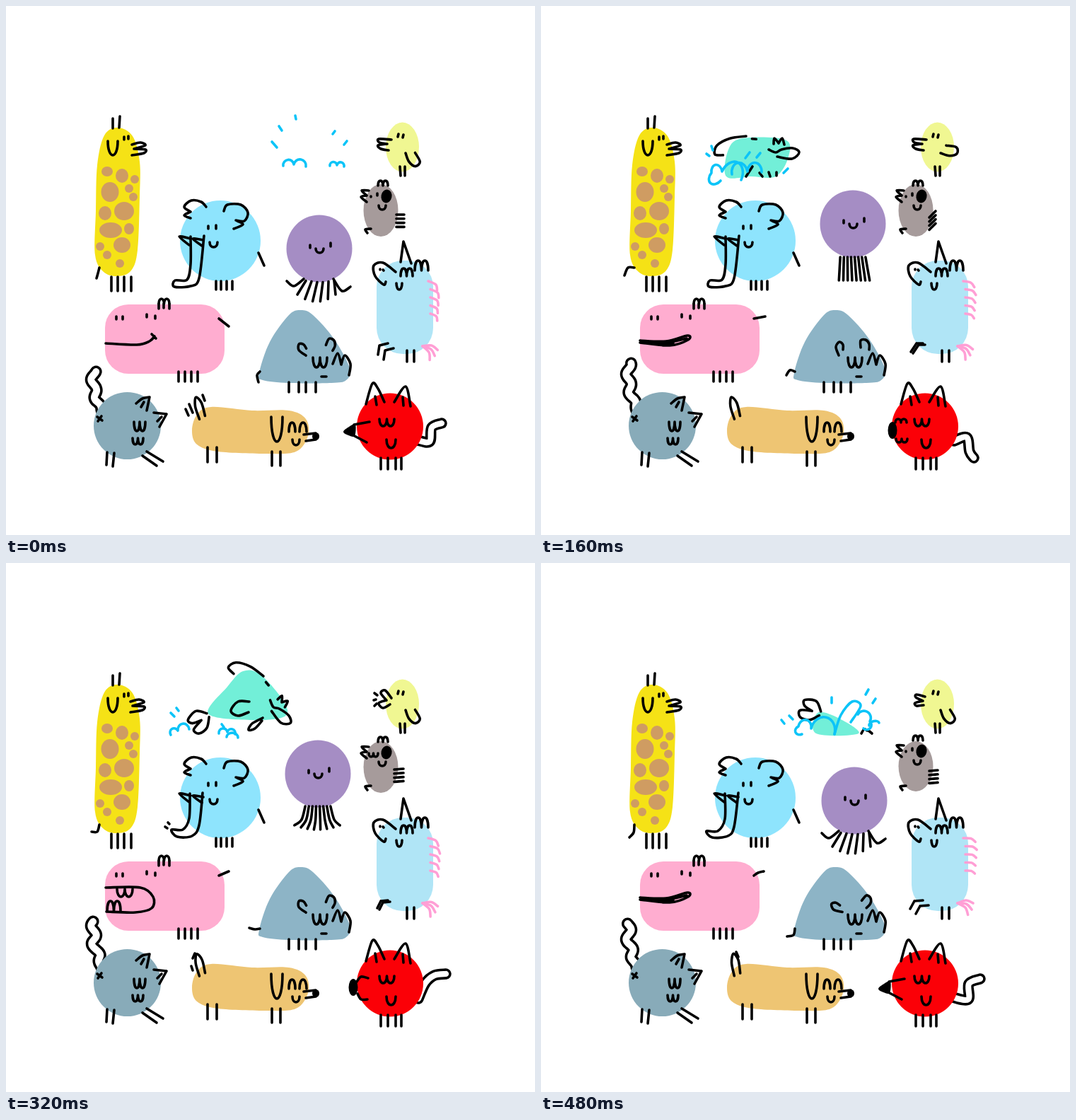
An HTML page with a canvas for the animation above (0.56 s loop, 748 by 748 pixels).

```html
<!DOCTYPE html>
<html lang="en">
<head>
<meta charset="utf-8">
<title>Animal parade</title>
<style>
html, body { margin: 0; width: 100%; height: 100%; overflow: hidden; background: #fff }
canvas { display: block }
</style>
</head>
<body>
<canvas id="stage" width="748" height="748"></canvas>
<script>
const ctx = document.getElementById('stage').getContext('2d');
const STEP = 80, COUNT = 7, WATER = '#0cc4f8', PINK = '#ff9fd5';
let pose = 0;

// Smooth curves through points; "|" starts a new stroke
function spline(text, closed) {
  const path = new Path2D();
  for (const part of text.split('|')) {
    const pts = part.match(/\S+ \S+/g).map(pair => pair.split(' ').map(Number));
    const n = pts.length;
    const at = i => pts[closed ? (i + n) % n : Math.max(0, Math.min(n - 1, i))];
    path.moveTo(...pts[0]);
    for (let i = 0; i < (closed ? n : n - 1); i++) {
      const [a, b, c, d] = [at(i - 1), at(i), at(i + 1), at(i + 2)];
      path.bezierCurveTo(b[0] + (c[0] - a[0]) / 6, b[1] + (c[1] - a[1]) / 6,
        c[0] - (d[0] - b[0]) / 6, c[1] - (d[1] - b[1]) / 6, ...c);
    }
  }
  return path;
}
function stroke(path, color = '#000', width = 3.6) {
  ctx.strokeStyle = color;
  ctx.lineWidth = width;
  ctx.stroke(path);
}
const ink = (text, color, width) => stroke(spline(text), color, width);
function fill(text, color) {
  ctx.fillStyle = color;
  ctx.fill(spline(text, true));
}
function oval(x, y, rx, ry, color = '#000', turn = 0) {
  ctx.fillStyle = color;
  ctx.beginPath();
  ctx.ellipse(x, y, rx, ry, turn, 0, 7);
  ctx.fill();
}
function box(x, y, w, h, r, color) {
  ctx.fillStyle = color;
  ctx.beginPath();
  ctx.roundRect(x, y, w, h, r);
  ctx.fill();
}
// Row of U shapes, upside down when h is negative
function cups(x, y, w, h, n = 1) {
  stroke(new Path2D(`M${x} ${y}` + `c0 ${h * 1.33} ${w} ${h * 1.33} ${w} 0`.repeat(n)));
}
function legs(top, bottom, ...xs) {
  xs.forEach(x => ink(`${x} ${top} ${x} ${bottom}`));
}
// Chain of arches between points
function waves(text, tall) {
  let last;
  stroke(new Path2D(text.match(/\S+ \S+/g).map(pair => {
    const p = pair.split(' ').map(Number);
    const turn = last && Math.atan2(p[1] - last[1], p[0] - last[0]) * 180 / Math.PI;
    const step = last ? `A1 ${tall} ${turn} 0 1 ${pair}` : `M${pair}`;
    last = p;
    return step;
  }).join('')), WATER);
}
function tube(text, width) {
  ink(text, '#000', width);
  ink(text, '#fff', width - 7.2);
}
function place(x, y, turn, draw) {
  ctx.save();
  ctx.translate(x, y);
  ctx.rotate(turn);
  draw();
  ctx.restore();
}
const now = list => list[pose];
const pick = (digits, ...list) => list[digits[pose]];

function giraffe() {
  fill('158 172 139 183 129 225 127 290 126 352 138 376 158 382 177 374 186 345 189 270 189 220 179 184', '#f5e216');
  ['143 234 8 7', '164 240 9 10', '182 245 6 6', '147 263 12.5 14', '174 258 6 6', '180 270 6 6', '167 290 14 13',
   '140 293 9 10', '148 317 16 11', '174 315 7 8', '164 338 12 11', '133 340 6 6', '143 352 6 6', '161 364 6 6']
    .forEach(spot => oval(...spot.split(' ').map(Number), '#cf9c62'));
  ink('151 159 151 173|161 156 160 172|167 185 167 189|173 184 173 188');
  cups(144, 191, 14, 20);
  legs(383, 403, 149, 158, 167, 177);
  place(pick('0101100', 0, -2), 0, 0, () => ink('178 196 190 193 197 197 181 202|181 202 197 203 195 208 178 211'));
  ink('132 370 ' + now(['130 378 128 385', '127 373 126 384', '123 370 118 381', '126 375 116 375', '129 380 121 380',
    '132 379 128 383', '131 381 125 388']));
}

function elephant() {
  oval(303, 332, 57, 57, '#8ee4fd');
  ink('261 300 252 296 261 291|261 291 252 284 262 275 276 277 283 284|308 290 313 281 332 281 342 292 337 304 325 303|327 304 335 309 322 315');
  ink('286 311 286 315|297 310 297 315|357 349 365 367');
  cups(288, 334, 11, 7);
  legs(389, 401, 297, 304, 312, 320);
  ink('261 329 245 326 259 338|279 331 264 329 277 339');
  ink(pick('0000123',
    '261 326 261 365 256 387 239 388 238 397 261 396 273 385 280 325',
    '260 326 259 361 250 377 234 377 242 387 263 386 273 371 278 325|229 367 231 369|225 373 228 375',
    '260 326 258 359 245 373 230 361 228 371 247 380 266 374 277 325|219 349 224 353|226 347 227 352|231 346 230 352',
    '260 326 260 362 250 379 234 379 242 388 264 386 273 373 279 325'));
}

function octopus() {
  place(pick('0111100', 443, 441), now([343, 326, 308, 293, 298, 307, 336]), 0, () => {
    oval(0, 0, 46.5, 47.5, '#a58dc4');
    ink('-13 -5 -13 -1|16 -8 16 -3');
    cups(-5, 0, 11, 6);
    const curl = pick('0122100', true), straight = pick('1100011', true);
    if (curl) ink('-46 46 -36 53 -22 43|20 43 32 60 44 54');
    const n = curl ? 6 : 8;
    for (let i = 0; i < n; i++) {
      const u = i - (n - 1) / 2;
      if (curl) ink(`${1 + u * 8} ${48 - Math.abs(u)} ${u * 10.8 - 4} ${75 - u * u * 1.6}`);
      else if (pick('0122100', 0, 0, 1)) ink(`${u * 5.1} 47 ${u * 6.2 + 2} 80`);
      else ink(`${u * 5.1} 46 ${u * 6.6} 65 ${u * 9.2 - 1} ${79 - u * u / 2}`);
    }
  });
}

function bird() {
  oval(560.5, 199.5, 23.5, 35, '#f0f792');
  ink('555 181 554 185|562 182 561 186|557 227 558 240|564 227 564 240');
  ink(pick('0001231',
    '545 189 527 188 528 193 539 195|539 195 526 197 530 202 541 204',
    '543 189 531 186 530 190 540 195|540 195 529 198 531 202 541 201',
    '545 191 536 180 530 184 538 194|538 194 527 198 533 205 543 200|521 184 525 187|520 194 523 193|521 202 524 199',
    '545 191 536 180 530 184 538 194|538 194 527 198 533 202 543 199|516 182 520 185|513 193 518 193|515 206 520 201'));
  place(565, 208, now([.8, .2, -.1, .1, .8, .4, .8]), () => ink('0 0 12 5 23 3 23 -6 9 -10'));
}

function koala() {
  const up = now([0, 0, 0, 1, 1, 5, 3]);
  oval(530, 289 - up / 2, 24.5, 37 - up / 2, '#a69b9b');
  place(0, -up, 0, () => {
    ink('513 261 503 261 510 268|510 268 502 270 510 277');
    cups(526, 254, 7, -7, 2);
    cups(527, 282, 10, 6);
    oval(538, 269, 7.5, 9.5, '#000', .2);
    if (pick('0001100', 0, 1)) cups(513, 270, 6.5, 5, 2);
    else ink('516 269 516 270|525 265 525 268');
  });
  ink('516 315 508 316 511 321');
  const [x, y, dx, dy] = now(['552 295 11 0', '552 297 9 -3', '549 299 9 -9', '550 294 11 -3', '549 292 13 -1', '550 290 13 2', '549 294 12 -1'])
    .split(' ').map(Number);
  for (let i = 0; i < 4; i++)
    ink(`${x} ${y + 5.8 * i} ${x + dx / 2} ${y + 5.8 * i + (pose === 1 ? -6 : dy / 2)} ${x + dx} ${y + 5.8 * i + dy}`);
}

function unicorn() {
  box(524, 360, 80, 132, 37, '#b0e5f6');
  ink('558 362 562 333|562 333 573 364|551 376 533 363 520 367 522 382 534 394 537 390|529 372 529 373|533 373 534 374');
  cups(558, 382, 8.5, -11, 2);
  cups(578, 374, 9.5, -14, 2);
  cups(552, 392, 8, 9);
  legs(487, 503, 567, 577);
  const [kx, ky, fx, fy] = now(['528 480 526 493', '529 475 521 489', '531 477 523 489', '531 475 523 482',
    '530 478 525 488', '528 476 521 482', '528 478 522 489']).split(' ').map(Number);
  const leg = `540 477 ${kx} ${ky}|${kx} ${ky} ${fx} ${fy}`, gap = pick('0011100', 8, 3);
  ink(leg);
  place(gap, gap - 1, 0, () => ink(leg));
  const tilt = now([.8, .65, .5, .6, .65, .5, .3]);
  for (let i = 0; i < 5; i++) {
    const x = i ? 600 : 597, y = 389 + i * 11.5, r = 18 - i;
    ink(`${x} ${y} ${x + r * .6} ${y + r * (tilt - .25) * .5} ${x + r * Math.cos(tilt)} ${y + r * Math.sin(tilt)}`, PINK);
  }
  for (let i = 0; i < 3; i++)
    place(589, 481, now([.25, .1, .2, .2, .2, .2, 0]) + i * .42, () => ink('0 0 12 -4 22 0', PINK));
}

function hippo() {
  box(140, 422, 169, 98, 33, '#ffadd0');
  cups(216, 421, 7.5, -7, 2);
  ink('216 421 216 428|223 421 223 427|231 421 231 428|156 439 156 443|165 439 165 443|199 436 199 440|211 438 211 442');
  legs(517, 531, 244, 253, 262, 271);
  const open = pick('0012321', 0, 1, 2, 3);
  ink(pick('0012321',
    '141 477 185 479 203 474 210 467|206 464 212 470',
    '140 473 177 474 207 466 208 472 182 480 140 476|141 475 173 477 206 470|166 475 173 480 187 477',
    '139 466 185 466 207 471 207 483 180 488 139 487',
    '141 459 190 459 208 472 206 488 183 494 142 493'));
  if (open === 2) {
    cups(159, 467, 10, 6, 2);
    cups(141, 487, 9.5, -8, 2);
  }
  if (open === 3) {
    cups(157, 461, 11, 11, 2);
    cups(143, 492, 9.5, -14, 2);
  }
  ink('301 442 ' + now(['315 453', '309 444 318 447', '317 439', '312 432', '315 436', '305 448 312 454', '307 438 315 436']));
}

function mouse() {
  fill('358 519 373 475 400 437 417 430 434 437 464 471 486 512 481 529 460 533 400 533 363 529', '#8db4c6');
  cups(434, 497, 10, 14, 2);
  ink('446 524 453 524|462 506 469 491 474 507|474 507 479 494 487 506 485 522');
  legs(532, 546, 400, 414, 424, 438);
  const tilt = now([.6, .25, 0, .25, .6, 1.45, 1]);
  place(423, 489, -tilt, () => ink('-2 5 -6 -7 -1 -14 4 -10 4 -3'));
  place(460, 482, tilt * .75, () => ink('-8 1 -8 -9 -1 -10 4 -4 4 4'));
  ink('359 517 ' + now(['355 522 357 532', '352 520 351 530', '352 515 347 522', '351 513 343 517', '352 518 344 516',
    '356 523 346 519', '357 526 348 528']));
}

function cat() {
  const top = now([517, 512, 505, 508, 507, 505, 510]), tail = [];
  for (let i = 0; i <= 30; i++) {
    const s = i / 30, y = 572 + (top - 572) * s;
    const sway = 3.8 * Math.sin((y - 535) / 4.3 + pose * Math.PI * 2 / COUNT) * Math.min(1, s * 4);
    tail.push(`${135 - 11 * Math.min(1, s * 1.8) + sway} ${y}`);
  }
  tube(tail.join(' '), 17);
  oval(171.5, 593.5, 47.5, 47.5, '#88abb9');
  ink('184 562 193 555 203 553|203 553 199 572|195 560 191 567|209 575 227 577|227 577 217 595|220 581 214 587');
  cups(181, 588, 8, 13, 2);
  cups(179, 611, 7.5, 9, 2);
  ink('129 581 136 586|135 580 130 587|143 631 142 649|153 632 151 651|193 636 213 650|199 630 222 644');
}

function dog() {
  fill('290 567 348 572 400 572 424 584 427 608 410 630 370 633 300 630 270 620 263 600 270 578', '#eec573');
  cups(375, 581, 16, 35);
  cups(400, 602, 9, -13);
  cups(415, 602, 10, -13);
  cups(405, 613, 10, 8);
  ink('421 606 438 604|424 615 438 613');
  oval(438, 608.5, 5, 5.5);
  legs(624, 645, 285, 298);
  legs(630, 650, 376, 388);
  place(277, 582, now([-.32, .05, -.3, -.95, -.28, 0, -.2]), () => ink('-4 1 -4 -18 1 -30 6 -20 5 -1'));
  const flicks = now(['254 570 258 579|259 563 264 575|278 550 281 558', '', '', '262 559 268 562|271 564 278 567',
    '267 552 264 559|262 570 264 576', '270 553 269 558|265 567 266 572', '276 550 279 557']);
  if (flicks) ink(flicks);
}

function fox() {
  tube(now(['582 614 599 616 602 596 616 590', '580 614 592 629 609 625 618 608', '584 615 602 610 606 630 612 639',
    '583 617 596 599 614 597 617 616', '583 616 593 594 606 583 622 581', '582 616 598 615 602 592 615 587',
    '582 614 604 617 605 595 621 588']), 15.5);
  oval(543, 594.5, 47, 47, '#fb0007');
  ink('509 563 518 534 526 541 535 560|522 552 524 564|549 560 565 538 572 566|561 553 562 565');
  cups(528, 584, 10.5, 10, 2);
  cups(538, 613, 13, 12);
  legs(639, 655, 530, 540, 551, 559);
  if (pick('0111100', true)) {
    fill('477 602 485 595 494 592 493 608 484 607', '#000');
    ink('492 592 514 588|489 606 510 617');
  } else {
    const near = pick('0022000', 0, 0, 1);
    oval(near ? 497 : 491, 600, 6.5, 12);
    if (near) {
      cups(501, 589, 8, -5, 2);
      cups(502, 612, 8, 5, 2);
    } else ink('496 592 502 585 512 587|497 609 502 617 511 617');
  }
}

const body = text => fill(text, '#72efd8');
const head = (x, y, turn) => place(x, y, turn, () =>
  ink('-18 -1 -8 3 0 -1 16 -3 25 3 15 12 -6 9|-11 -9 -10 -17 -4 -10|-4 -10 1 -17 4 -8'));
const back = (x, y, turn) => place(x, y, turn, () => ink('-41 10 -51 4 -43 -6 -22 -7 0 0|6 7 11 10'));
const flipper = (x, y, turn) => place(x, y, turn, () => ink('0 0 -16 0 -26 13 -16 20 -1 15'));
const fluke = (x, y, turn) => place(x, y, turn, () => ink('-1 -3 -14 -12 -29 -5 -25 2 -12 3|-12 3 -27 11 -22 19 -9 16 0 3'));

const leap = [
  () => {
    ink('376 192 383 200|386 170 390 176|409 155 410 160|462 181 465 177|478 196 482 191', WATER);
    waves('392 226 407 224 424 227', 1);
    waves('458 226 468 225 478 227', 1);
  },
  () => {
    body('238 241 268 210 300 197 317 204 308 241 273 241');
    ink('229 244 236 236|243 227 249 220|259 219 264 216|309 233 314 240');
    head(304, 210, -.75);
    waves('229 245 233 235 243 234 261 240', 1.8);
    waves('287 242 304 238 320 240 326 247', 1.6);
  },
  () => {
    body('262 241 265 203 285 187 345 189 350 213 332 241 297 241');
    back(290, 184, -.45);
    head(340, 204, 0);
    ink('290 241 299 227|309 236 313 241|322 235 324 241|333 235 333 240');
    waves('254 247 241 236 256 234 283 246', 1.4);
    waves('270 238 292 234 312 235', 1.3);
    ink('234 209 238 212|241 198 243 204|289 215 295 207|305 214 310 208|343 236 349 230', WATER);
  },
  () => {
    body('275 238 292 183 318 158 352 162 382 184 380 208 345 222');
    back(337, 158, 0);
    head(372, 200, .2);
    flipper(325, 198, -.35);
    ink('353 217 346 236|338 220 340 235|254 240 265 231 281 237');
    waves('246 235 245 224 257 225 288 238', 1.5);
    waves('305 240 327 233 344 239', 1);
    waves('317 239 339 243 325 248', .7);
    ink('276 189 279 196|287 187 285 193|297 219 300 214|353 236 360 234', WATER);
  },
  () => {
    body('286 213 313 175 335 153 360 158 392 195 394 217 345 222');
    back(364, 160, .32);
    head(386, 207, .75);
    flipper(344, 196, 0);
    ink('363 219 348 227 343 236 352 234 362 223');
    fluke(286, 215, -.4);
    waves('233 243 243 237 259 235', 1.1);
    waves('301 241 313 239 324 242', 1);
    waves('312 246 328 247', .8);
    ink('233 212 238 217|241 205 244 209|305 228 308 232', WATER);
  },
  () => {
    body('322 194 360 177 405 172 418 200 405 241 372 241 348 213');
    back(415, 195, .85);
    flipper(377, 210, .35);
    fluke(321, 194, 0);
    ink('357 241 367 236|401 237 405 241|412 236 417 241');
    ink('254 242 258 242|267 242 270 242|276 243 279 243', WATER);
    waves('349 246 350 236 374 239 399 239 424 239 437 247', 1.4);
  },
  () => {
    body('389 241 391 212 420 219 449 241');
    fluke(395, 213, .55);
    ink('453 241 457 235 461 237|462 236 468 241');
    waves('369 242 364 231 382 234 415 242', 1.2);
    ink('415 242 424 215 440 196 452 202 438 225', WATER);
    waves('448 214 465 224 456 234', 1);
    waves('464 230 478 226', .6);
    ink('340 222 344 227|351 216 356 221|411 190 411 198|459 186 463 179|469 198 473 192', WATER);
  }
];

const parade = [giraffe, elephant, octopus, bird, koala, unicorn, hippo, mouse, cat, dog, fox, () => now(leap)()];
ctx.lineCap = ctx.lineJoin = 'round';

function draw() {
  pose = Math.floor(performance.now() / STEP) % COUNT;
  ctx.fillStyle = '#fff';
  ctx.fillRect(0, 0, 748, 748);
  parade.forEach(animal => animal());
  requestAnimationFrame(draw);
}
draw();
</script>
</body>
</html>
```
